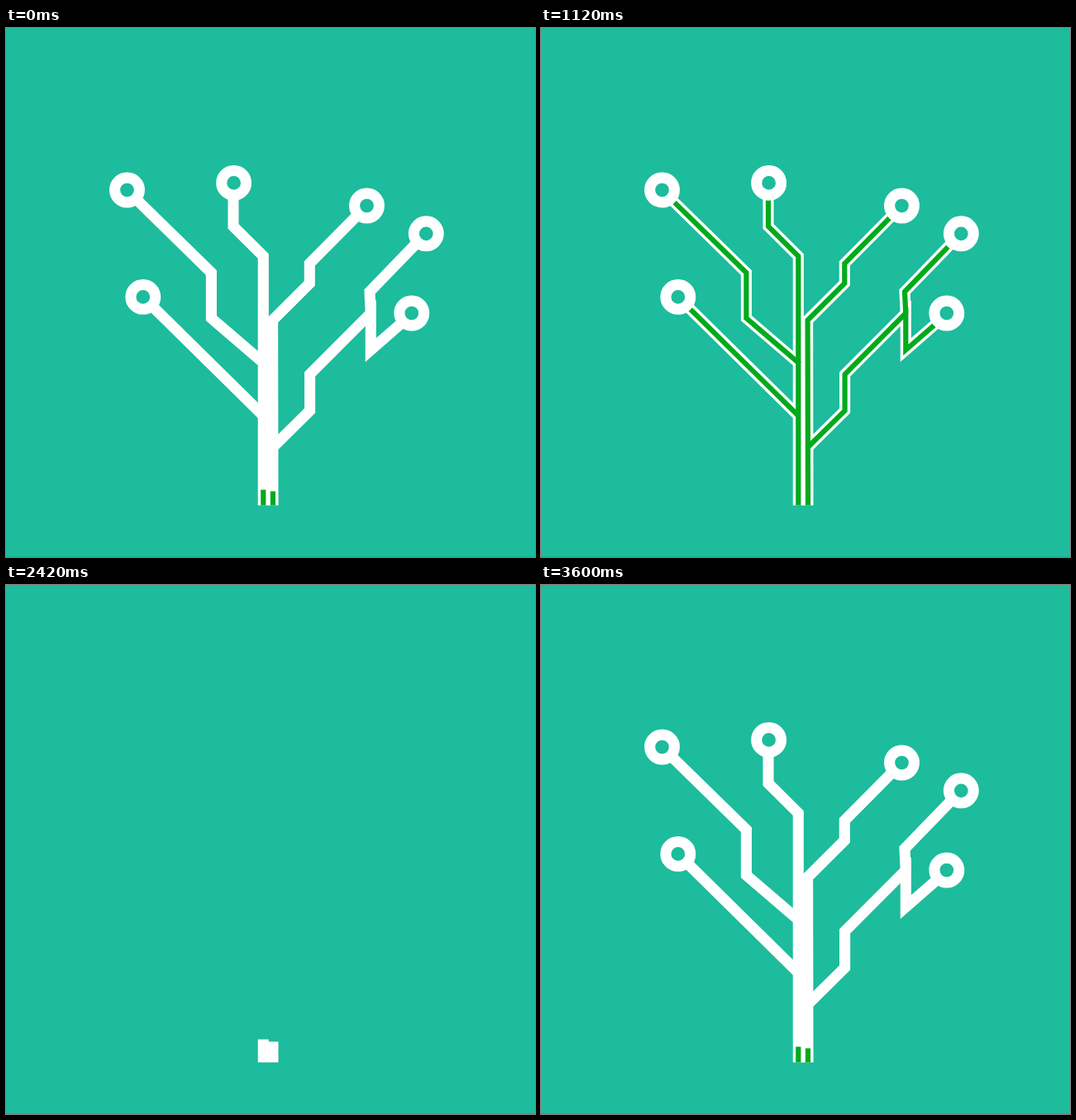
An HTML page for the animation above (3.62 s loop, 640 by 640 pixels).

```html
<!DOCTYPE html>
<html lang="en">
<head>
<meta charset="utf-8">
<title>Circuit tree</title>
<style>
  html, body { margin: 0; width: 100%; height: 100%; overflow: hidden; background: #1cbc9c; }
  svg { display: block; width: 100vw; height: 100vh; }
  path, circle { fill: none; }
  .wood, .ring { stroke: #fff; stroke-width: 13.1; stroke-miterlimit: 6; }
  .sap { stroke: #00ab1a; stroke-width: 6.2; stroke-miterlimit: 6; }
</style>
</head>
<body>
<svg id="stage" viewBox="0 0 640 640">
  <rect y="639" width="640" height="1" fill="#1bb394"/>
</svg>
<script>
const LOOP = 3620, STEP = 20;
const TRUNK_TIME = 678, BRANCH_TIME = 530, ERASE_TIME = 581;
const SAP = { grow: -21, erase: 1420 };
const WOOD = { grow: 2389, erase: 1620 };
const RING = { grow: 3040, erase: 1750 };

// d: centre line, delay: wait after the trunk sets off
const branches = [
  { d: 'M311.3 577.5V405L248.4 351V296L157 206.6', delay: 0, time: TRUNK_TIME, trunk: true },
  { d: 'M323 577.5L322.6 353.5L367.3 309V285L426 225.6', delay: 0, time: TRUNK_TIME, trunk: true },
  { d: 'M311.3 405V276L275 240V202', delay: 375, time: 560 },
  { d: 'M311.3 469L176.4 336', delay: 160, time: BRANCH_TIME },
  { d: 'M321.6 508.5L367.6 463V419L441.3 345V389L480.2 355.6'.replace('389L', '389.5L'), delay: 143, time: BRANCH_TIME },
  { d: 'M441.3 346L440 319L497.7 259.4', delay: 648, time: BRANCH_TIME }
];

// centre and the angle at which the branch meets the ring
const rings = [
  [146.5, 196, 45], [275.6, 187.4, 90], [436.5, 215, 135],
  [508.3, 248.8, 135], [490.8, 345, 135], [165.8, 325.4, 45]
];

const stage = document.getElementById('stage');

function add(tag, attrs) {
  const node = document.createElementNS(stage.namespaceURI, tag);
  for (const key in attrs) node.setAttribute(key, attrs[key]);
  node.setAttribute('pathLength', 1);
  return stage.appendChild(node);
}

const ramp = (t, start, time) => Math.min(1, Math.max(0, (t - start) / time));
const easeOut = x => 1 - Math.pow(1 - x, 1.4);

const makeBranches = (cls, plan) => branches.map(b => ({
  node: add('path', { class: cls, d: b.d }),
  plan, delay: b.delay, time: b.time, ease: b.trunk ? easeOut : x => x
}));

const strokes = [
  ...makeBranches('wood', WOOD),
  ...makeBranches('sap', SAP),
  ...rings.map(([cx, cy, angle]) => ({
    node: add('circle', { class: 'ring', cx, cy, r: 14.9, transform: `rotate(${angle} ${cx} ${cy})` }),
    plan: RING, delay: 0, time: BRANCH_TIME, ease: x => x
  }))
];

function showSpan(node, from, to) {
  node.style.visibility = to > from ? 'visible' : 'hidden';
  node.style.strokeDasharray = to - from >= 1 ? 'none' : `${Math.max(0, to - from)} 2`;
  node.style.strokeDashoffset = -from;
}

function draw(t) {
  for (const { node, plan, delay, time, ease } of strokes) {
    const grown = ease(ramp(t, plan.grow + delay, time));
    const erased = ramp(t, plan.erase, ERASE_TIME);
    // white parts start the loop complete and regrow after being erased
    if (plan === SAP) showSpan(node, erased, grown);
    else if (t < WOOD.grow) showSpan(node, erased, 1);
    else showSpan(node, 0, grown);
  }
}

const begin = performance.now();
function tick() {
  const t = Math.floor(((performance.now() - begin) % LOOP) / STEP) * STEP;
  draw(t >= LOOP - STEP ? 0 : t);
  requestAnimationFrame(tick);
}
tick();
</script>
</body>
</html>
```
